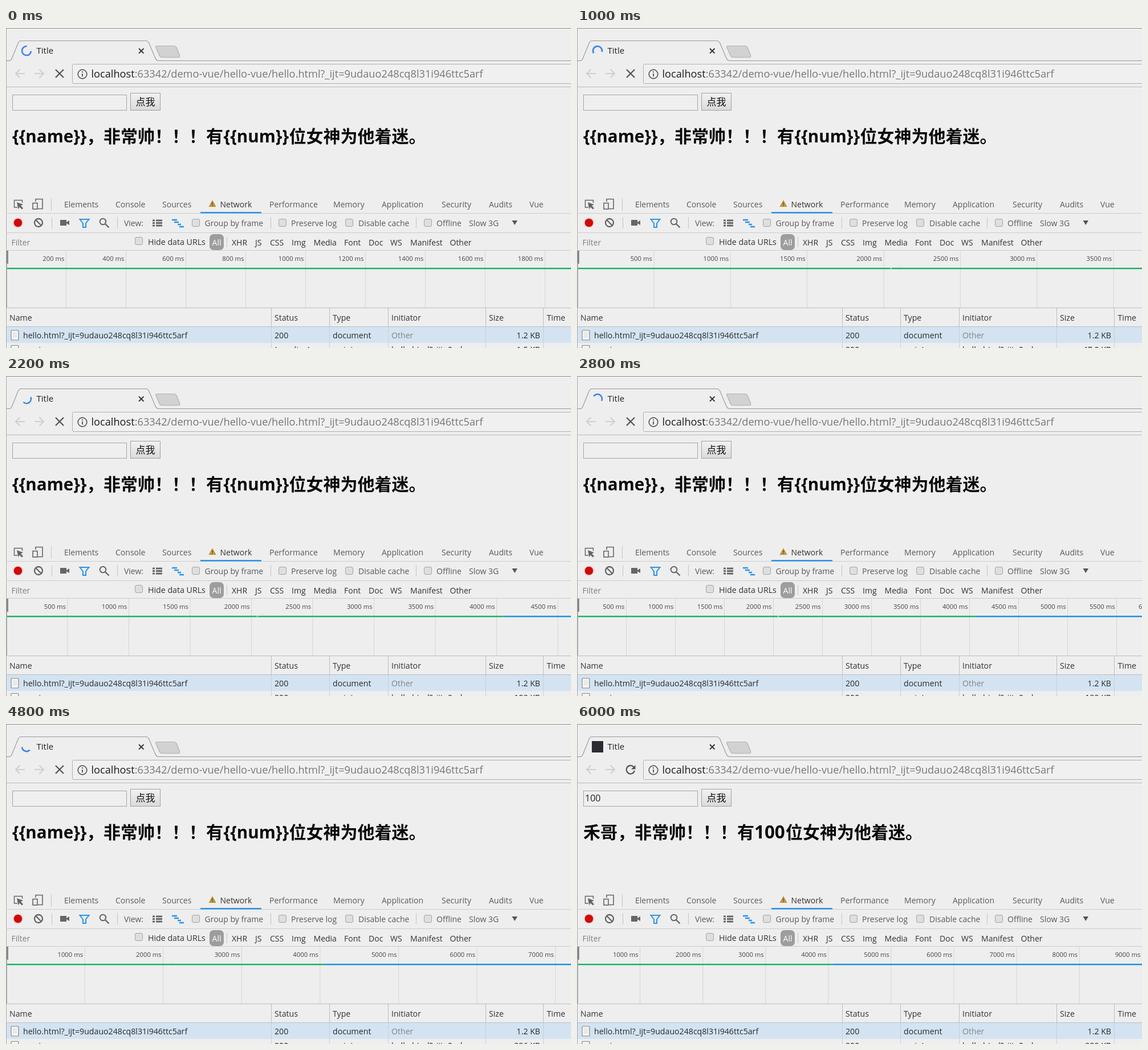
An HTML page that plays this animation: 991 px wide and 562 px high, repeating every 6.4 s.

```html
<!DOCTYPE html>
<html lang="zh">
<head>
<meta charset="utf-8">
<title>Title</title>
<style>
html, body { margin: 0; width: 100%; height: 100%; overflow: hidden; background: #eee; }
svg { display: block; width: 991px; height: 562px; }
text { font-family: "Open Sans", "Noto Sans CJK SC", "Noto Sans CJK", sans-serif; white-space: pre; }
</style>
</head>
<body>
<svg id="stage" viewBox="0 0 991 562" fill="none"></svg>
<script>
const stage = document.getElementById('stage');

// Drawing helpers, each returning SVG markup
const text = (x, y, str, size = 14, fill = '#5a5a5a', more = '') =>
  `<text x="${x}" y="${y}" font-size="${size}" fill="${fill}" ${more}>${str}</text>`;
const rect = (x, y, w, h, fill, more = '') =>
  `<rect x="${x}" y="${y}" width="${w}" height="${h}" fill="${fill}" ${more}/>`;
const path = (d, stroke, width = 1, fill = 'none') =>
  `<path d="${d}" stroke="${stroke}" stroke-width="${width}" fill="${fill}"/>`;
const circle = (x, y, r, fill, stroke = 'none', width = 1) =>
  `<circle cx="${x}" cy="${y}" r="${r}" fill="${fill}" stroke="${stroke}" stroke-width="${width}"/>`;
const hline = (y, fill) => rect(0, y, 991, 1, fill);
const vline = (x, y, h, fill = '#c4c4c4') => rect(x, y, 1, h, fill);
const row = (y, items, size, fill) => items.map(([x, s]) => text(x, y, s, size, fill)).join('');
const checkbox = (x, y) => rect(x + .5, y + .5, 13, 13, '#dedede', 'rx="2.5" stroke="#a5a5a5"');
const fileIcon = y => rect(9, y, 13, 17, '#f4f4f4', 'rx="1" stroke="#888" stroke-width="1.2"') +
  path(`M12 ${y + 5}h7m-7 3h7m-7 3h7`, '#d3d3d3');

const FILE = 'hello.html?_ijt=9udauo248cq8l31i946ttc5arf';
const COLUMNS = [465, 567, 670, 841, 942];
const CELL = 14.15, INK = '#2a2a2a', ROW2 = 570;

function browser() {
  return hline(0, '#8c8c8c') + vline(0, 0, 562, '#a6a6a6') +
    path('M0 57.5H6Q9 57 10.500 53L21 27Q23 22.500 26 22.500H245Q249 22.500 251 27L262 53Q264 57.500 268 57.500H991', '#979797', 1.1) +
    path('M264 31.500H294Q298 31.500 299.500 35L304.500 48Q305.500 51.500 302 51.500H274Q270.500 51.500 269 48L263 34Q262 31.500 264 31.500Z', '#b0b0b0', 1.2, '#d2d2d2') +
    text(53.5, 45, 'Title', 15, '#222') +
    path('M233 36l8.500 8.500m0-8.500l-8.500 8.500', '#333', 1.8) +
    path('M33 80H17m7.500-7.500L17 80l7.500 7.500M50 80H66m-7.500-7.500L66 80l-7.500 7.500', '#cfcfcf', 2) +
    rect(116.5, 63.5, 900, 34, '#f0f0f0', 'rx="2" stroke="#b0b0b0"') +
    circle(134, 81, 7.8, 'none', '#555', 1.7) + path('M134 80v5.200M134 76.300v2', '#555', 1.9) +
    text(149.5, 87, `<tspan fill="#1c1c1c">localhost</tspan>:63342/demo-vue/hello-vue/${FILE}`, 18.2, '#777') +
    hline(103, '#b8b8b8');
}

function page() {
  return rect(11.5, 117.5, 200, 27, '#efefef', 'stroke="#a5a5a5"') +
    rect(218.5, 114.5, 52, 30, 'url(#button)', 'stroke="#a0a0a0"') +
    text(244.5, 136, '点我', 17, '#111', 'text-anchor="middle"');
}

function devtools() {
  const grey = '#666', blue = '#2a93ea';
  const tabs = [[102, 'Elements'], [192, 'Console'], [274, 'Sources'], [462, 'Performance'], [574, 'Memory'],
    [659, 'Application'], [764, 'Security'], [847, 'Audits'], [918, 'Vue']];
  const options = [[207, 'View:'], [348.5, 'Group by frame'], [500, 'Preserve log'],
    [618, 'Disable cache'], [755, 'Offline'], [812, 'Slow 3G']];
  const kinds = [[396, 'XHR'], [437, 'JS'], [463, 'CSS'], [501, 'Img'], [539.5, 'Media'], [593, 'Font'],
    [636, 'Doc'], [674, 'WS'], [709, 'Manifest'], [778.5, 'Other']];
  return row(315, tabs) + text(375.5, 315, 'Network', 14, '#333') +
    path('M20 315H14.500V302.500H28.500V307', grey, 1.5) + path('M19 306l11 4-4 2 4 4.500-2 2-4.500-4-2 4z', 'none', 0, grey) +
    path('M52 305V300.500H64V317.500H56', grey, 1.6) + rect(47, 307.5, 8, 10.5, '#eee', 'stroke="#666" stroke-width="1.6"') +
    vline(79, 299, 22) +
    path('M362 303.500l5.500 10h-11z', '#b88a30', 1.2, '#c99a38') + path('M362 306.500v3.500m0 1v1.500', '#5b4720', 1.4) +
    hline(325, '#ccc') + rect(341, 323, 107, 2.5, blue) +
    circle(21, 342, 9, '#f0d0cd') + circle(21, 342, 7.3, '#d00a0a') +
    circle(57, 342, 7, 'none', grey, 2.3) + path('M52 337l10 10', grey, 2.3) +
    vline(80, 332, 20) +
    rect(95, 337, 11, 10, grey) + path('M106 341l5-3v8l-5-3z', 'none', 0, grey) +
    path('M129.500 336h16l-5.500 7v7h-5v-7z', blue, 2) +
    circle(170, 340, 5.3, 'none', grey, 2) + path('M174 344l6.500 6.500', grey, 2.4) +
    vline(195, 332, 20) +
    path('M257 338h4m2 0h11M257 342.500h4m2 0h11M257 347h4m2 0h11', grey, 3) +
    path('M291 337h9m-5 4h8m-2 4h6m-3 4h8', blue, 2.4) +
    [[326, 335], [478, 335], [595, 335], [733, 335], [226, 367]].map(p => checkbox(...p)).join('') +
    vline(464, 332, 20) + vline(719, 332, 20) + row(348, options) +
    path('M887.500 338h9.500l-4.750 8z', 'none', 0, '#555') +
    hline(359, '#ccc') +
    text(9.5, 382, 'Filter', 14, '#808080') + text(249, 381, 'Hide data URLs', 14.2, '#333') +
    rect(357, 362, 25, 28, '#9d9d9d', 'rx="7"') + text(369.5, 382, 'All', 14, '#fff', 'text-anchor="middle"') +
    vline(387, 367, 18) + row(382, kinds, 14, '#333') +
    hline(390, '#ccc');
}

function table() {
  const heads = [[6, 'Name'], [471, 'Status'], [573, 'Type'], [676, 'Initiator'], [847, 'Size'], [948.5, 'Time']];
  return hline(491, '#bdbdbd') + row(514, heads, CELL, '#333') + hline(524, '#bdbdbd') +
    rect(1, 525, 990, 28, '#d3e3f2') +
    COLUMNS.map(x => vline(x, 492, 32, '#bdbdbd') + vline(x, 525, 37, '#c6d0da')).join('') +
    fileIcon(531) + fileIcon(557.5) +
    row(545, [[30, FILE], [471, '200'], [573, 'document']], CELL, INK) +
    text(676, 545, 'Other', CELL, '#858585') +
    text(937, 545, '1.2 KB', CELL, INK, 'text-anchor="end"') +
    row(ROW2, [[30, 'vue.js'], [573, 'script'], [676, FILE.slice(0, 20)]], CELL, INK);
}

// Heading: Latin parts are placed on the 30px grid of the Chinese characters
function heading(loaded) {
  const parts = loaded
    ? [[11, '禾哥，非常帅！！！有'], [311, '100', 31.4], [366, '位女神为他着迷。']]
    : [[11, '{{name}}', 29.6], [141, '，非常帅！！！有'], [381.5, '{{num}}', 29.6], [496.5, '位女神为他着迷。']];
  return '<g font-weight="bold">' + parts.map(([x, s, size = 30]) =>
    text(x, 201, s, size, '#0a0a0a', 'lang="zh-CN"')).join('') + '</g>';
}

// The visible range grows by a quarter each time loading outruns it
function timeline(zoom) {
  const scale = 989 / (1884 * 1.25 ** zoom);
  const at = ms => .5 + ms * scale;
  const step = [200, 500, 1000].find(s => s * scale > 75);
  let out = '';
  for (let ms = step; at(ms) < 1040; ms += step) {
    out += rect(at(ms) - .5, 391, 1, 100, '#d6d6d6') +
      text(at(ms) - 3, 409, ms + ' ms', 11.3, '#444', 'text-anchor="end"');
  }
  const split = Math.min(991, at(4060));
  out += vline(1, 391, 100, '#aaa') + rect(1, 391, 3, 23, '#888') +
    rect(2, 421, split - 2, 2.5, '#18b566') + rect(split, 421, 991 - split, 2.5, '#1c93e0');
  if (zoom > 2) out += rect(at(2095), 418, 2, 1, '#ccc');
  if (zoom > 2 && zoom < 6) out += rect(at(2043), 421, 2, 2, '#c9dccf');
  return out;
}

// cubic-bezier(.4, 0, .2, 1)
function ease(x) {
  let lo = 0, hi = 1, u = .5;
  for (let i = 0; i < 20; i++) {
    u = (lo + hi) / 2;
    const bx = 1.2 * u * (1 - u) ** 2 + .6 * u * u * (1 - u) + u ** 3;
    if (bx < x) lo = u; else hi = u;
  }
  return u * u * (3 - 2 * u);
}

// The arc shrinks, then grows, every two phases while turning steadily
function spinner(time) {
  const ms = 20 + time * 1.015, phase = Math.floor(ms / 666);
  let sweep = 270 * ease(ms / 666 - phase) - (phase % 2 ? 0 : 270);
  if (Math.abs(sweep) < 5) sweep = sweep < 0 ? -5 : 5;
  const start = 270 + ms / 1568 * 360 + Math.floor(phase / 2) % 4 * 270;
  const point = deg => {
    const a = deg * Math.PI / 180;
    return `${36 + 8 * Math.cos(a)} ${40 + 8 * Math.sin(a)}`;
  };
  return path(`M${point(start)}A8 8 0 ${+(Math.abs(sweep) > 180)} ${+(sweep > 0)} ${point(start + sweep)}`, '#3b84ea', 2.6);
}

const LOADED = 6000;
const ZOOM_TIMES = [200, 400, 1000, 2200, 2800, 4800, LOADED];

function scene(time) {
  const loaded = time >= LOADED;
  const zoom = ZOOM_TIMES.filter(t => time >= t).length - (time < 1000 ? 0 : 0);
  const size = time ? 47 * time / 1000 : 1.5;
  return heading(loaded) + timeline(zoom) +
    text(471, ROW2, time ? '200' : '(pending)', CELL, INK) +
    text(937, ROW2, size.toFixed(size < 100 ? 1 : 0) + ' KB', CELL, INK, 'text-anchor="end"') +
    (loaded
      ? rect(26, 30, 20, 20, '#2b2b33') + text(14, 136, '100', 16, '#222') +
        path('M99.500 75.500A7.300 7.300 0 1 0 101 82', '#555', 2.2) + path('M102.500 72v7.500H95z', 'none', 0, '#555')
      : spinner(time) + path('M87 73l14 14m0-14l-14 14', '#555', 2.3));
}

stage.innerHTML = `<defs><linearGradient id="button" x2="0" y2="1">
  <stop stop-color="#f2f2f2"/><stop offset="1" stop-color="#dadada"/></linearGradient></defs>` +
  browser() + page() + devtools() + table() + '<g id="live"></g>';
const live = document.getElementById('live');

const begin = performance.now();
let shown = -1;
function tick() {
  const elapsed = (performance.now() - begin) % 6400;
  const time = Math.min(6000, Math.floor(elapsed / 200) * 200);
  if (time !== shown) live.innerHTML = scene(shown = time);
  requestAnimationFrame(tick);
}
tick();
</script>
</body>
</html>
```
